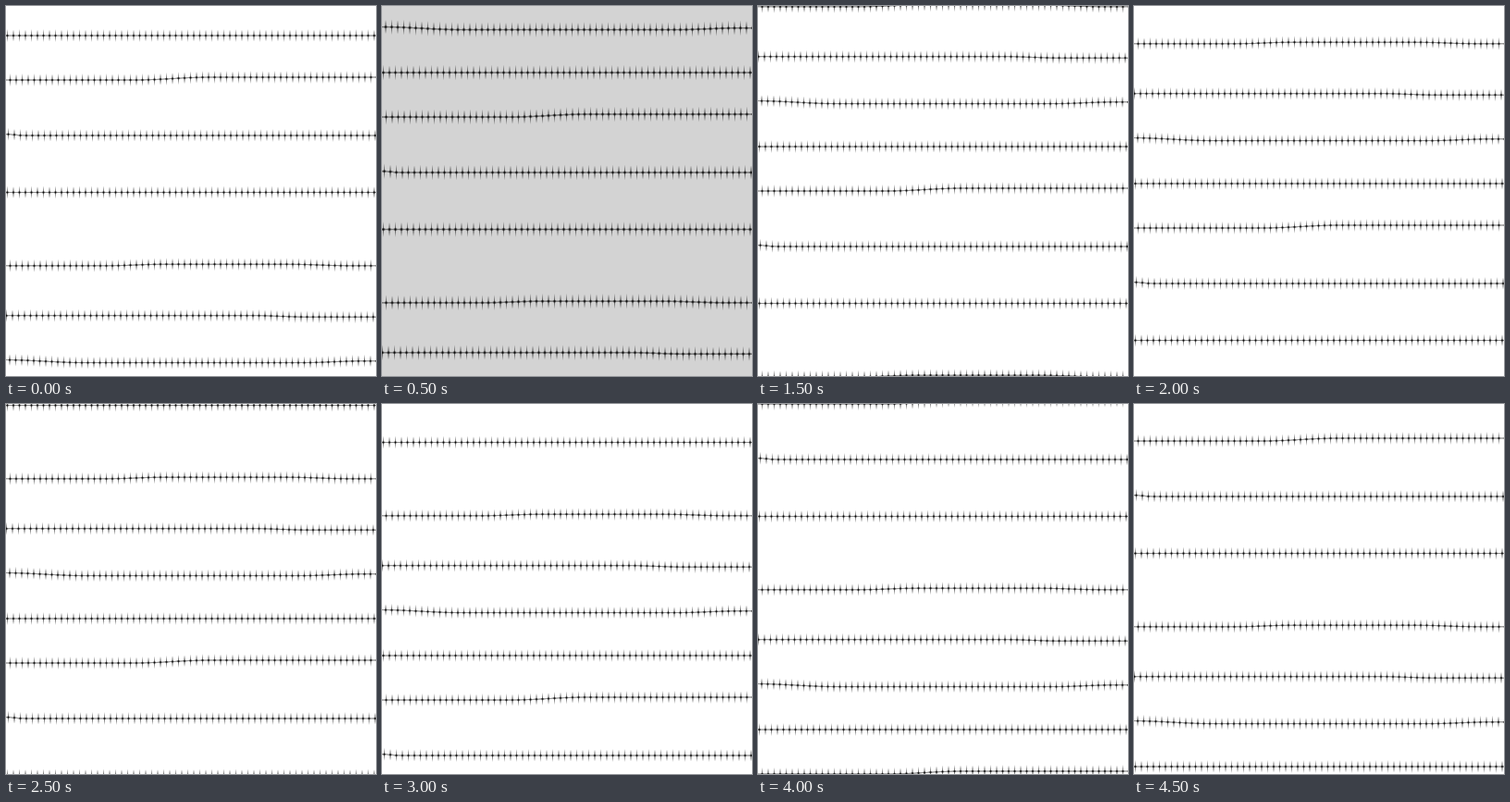
An HTML page with a canvas that plays this animation: 400x400 px, repeating every 5000 ms.

```html
<!DOCTYPE html>
<html lang="en">
<head>
<meta charset="utf-8">
<title>Drifting wires</title>
<style>
  html, body { margin: 0; width: 100%; height: 100%; overflow: hidden; background: #fff; }
  canvas { display: block; width: 400px; height: 400px; }
</style>
</head>
<body>
<canvas id="stage" width="400" height="400"></canvas>
<script>
const SIZE = 400, STEP_MS = 500, STEPS = 10, DROP = 40, GAP = 6.5;
const ctx = document.getElementById('stage').getContext('2d');

// Each wire: phase of its first barb, then x, y knots joined by smooth ramps.
const wires = [
  { phase: 1.5, knots: [[0, 32]] },
  { phase: 4.5, knots: [[140, 80], [220, 77]] },
  { phase: 2.5, knots: [[0, 138.6], [20, 140]] },
  { phase: 1.5, knots: [[0, 201.5]] },
  { phase: 4.5, knots: [[110, 280.8], [170, 279.2], [305, 279.2], [372, 280.8]] },
  { phase: 0.5, knots: [[270, 334.7], [325, 336.2]] },
  { phase: 4, knots: [[0, 382.6], [85, 385.6], [320, 385.6], [385, 383.8]] }
];

function heightAt(knots, x) {
  let [px, py] = knots[0];
  for (const [kx, ky] of knots) {
    if (x <= kx) {
      const t = kx > px ? Math.max(0, (x - px) / (kx - px)) : 1;
      return py + (ky - py) * t * t * (3 - 2 * t);
    }
    [px, py] = [kx, ky];
  }
  return py;
}

// Soft ellipse whose ink fades from the centre outwards.
function glow(x, y, rx, ry, alpha) {
  ctx.save();
  ctx.translate(x, y);
  ctx.scale(rx, ry);
  const ink = ctx.createRadialGradient(0, 0, 0, 0, 0, 1);
  ink.addColorStop(0, `rgba(0,0,0,${alpha})`);
  ink.addColorStop(0.5, `rgba(0,0,0,${alpha * 0.55})`);
  ink.addColorStop(1, 'rgba(0,0,0,0)');
  ctx.fillStyle = ink;
  ctx.fillRect(-1, -1, 2, 2);
  ctx.restore();
}

function barb(x, y, strength) {
  glow(x, y, 1.1, 7 * strength, 0.65);
  glow(x, y, 5, 1.2 * strength, 0.65);
  glow(x, y, 1.7 * strength, 1.7 * strength, 0.7);
}

function drawWire({ phase, knots }, shift, strength) {
  for (let x = phase - GAP; x < SIZE + GAP; x += GAP) {
    const y = (heightAt(knots, x) + shift) % SIZE;
    for (const top of [y - SIZE, y, y + SIZE]) {
      if (top > -10 && top < SIZE + 10) barb(x, top, strength);
    }
  }
}

function draw(step) {
  const dim = step === 1;
  ctx.fillStyle = dim ? '#d3d3d3' : '#fff';
  ctx.fillRect(0, 0, SIZE, SIZE);
  for (const wire of wires) drawWire(wire, step * DROP, dim ? 1.2 : 1);
}

let shown = -1;
const start = performance.now();
function tick(now) {
  const step = Math.floor(Math.max(0, now - start) / STEP_MS) % STEPS;
  if (step !== shown) draw(shown = step);
  requestAnimationFrame(tick);
}
tick(start);
</script>
</body>
</html>
```
